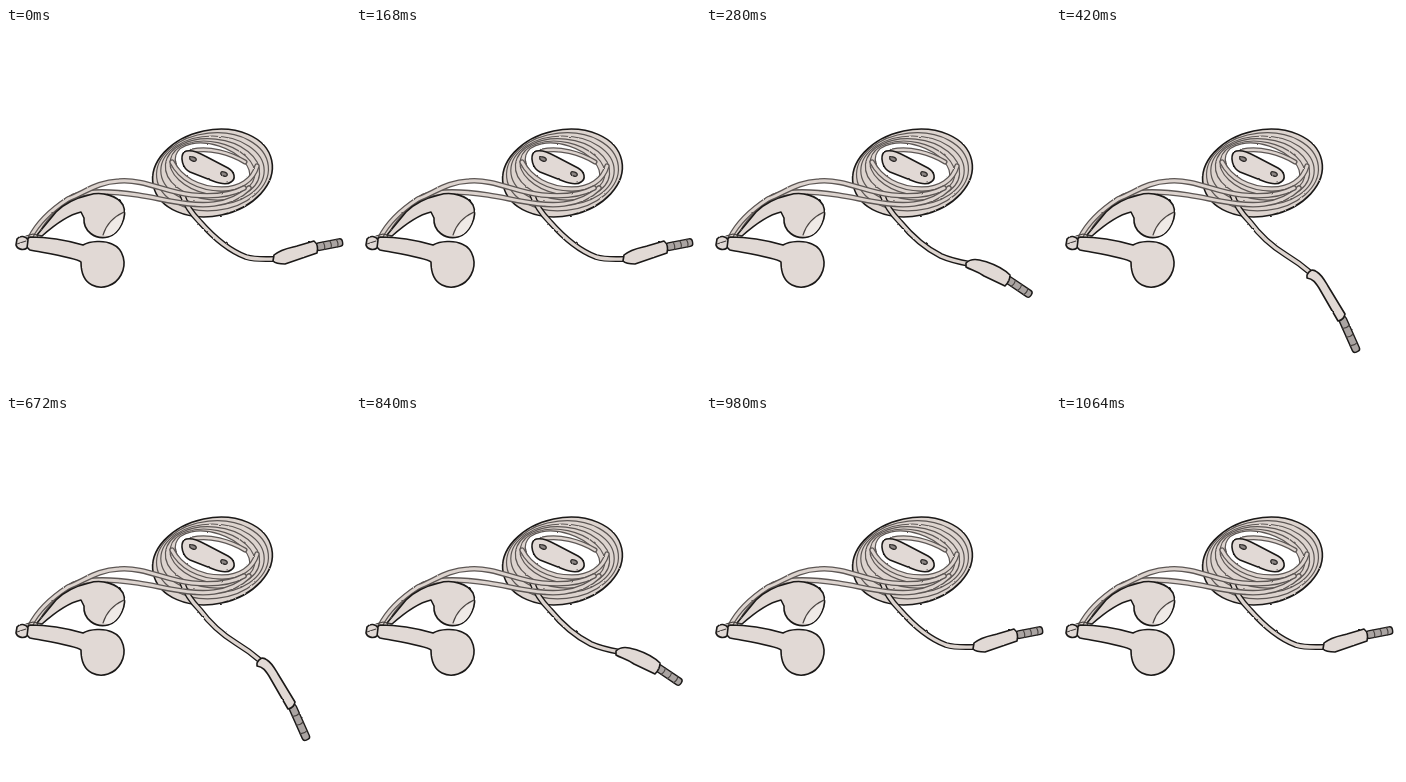
Recreate the animation shown at these times as an HTML page. Size 344 by 360 pixels, loop 1.12 s.

```html
<!DOCTYPE html>
<html lang="en">
<head>
<meta charset="utf-8">
<title>Earphones</title>
<style>
html, body { margin: 0; width: 100%; height: 100%; overflow: hidden; background: #fff; }
svg { display: block; width: 100%; height: 100%; }
path, rect, ellipse { stroke-linecap: round; stroke-linejoin: round; }
.body { fill: #e1d9d5; stroke: #1b1918; stroke-width: 1.6; }
.line { fill: none; stroke: #45403e; stroke-width: 1.1; }
.dot { fill: #8c8583; stroke: #2b2827; stroke-width: 1.2; }
.pose { opacity: 0; }
</style>
</head>
<body>
<svg viewBox="0 0 344 360">
  <defs>
    <filter id="rough" filterUnits="userSpaceOnUse" x="0" y="0" width="344" height="360" color-interpolation-filters="sRGB">
      <feTurbulence type="fractalNoise" baseFrequency=".16" numOctaves="2" seed="4"/>
      <feDisplacementMap in="SourceGraphic" scale="1.7" xChannelSelector="R" yChannelSelector="G"/>
    </filter>
  </defs>
  <g filter="url(#rough)">
    <g id="coil"></g>
    <g id="remote">
      <path class="body" d="M178 124C183 121 190 123 199 128L222 140C229 144 230 151 225 154C221 157 215 156 207 153L184 144C176 140 174 129 178 124Z"/>
      <ellipse class="dot" cx="187" cy="131" rx="3.4" ry="2" transform="rotate(22 187 131)"/>
      <ellipse class="dot" cx="218" cy="146" rx="3.4" ry="2" transform="rotate(22 218 146)"/>
    </g>
    <g id="poses"></g>
    <g id="leads"></g>
    <g id="buds">
      <path class="body" d="M31 207L50 184C59 175 70 170 83 167C96 163 112 168 117 177C122 188 114 206 102 209C89 212 77 203 78 190L75 184C66 186 54 192 36 208Z"/>
      <path d="M98 207C101 198 108 190 117 186C117 196 111 206 102 208Z" fill="#efeae7"/>
      <path class="line" d="M97 207C100 197 107 189 118 184"/>
      <path class="body" d="M24 209C40 209 60 212 77 217C84 213 98 212 106 216C118 221 121 236 115 247C109 258 96 262 86 257C78 253 75 245 75 234C71 230 45 226 24 222C19 219 20 211 24 209Z"/>
      <path class="body" d="M11 211C14 207 20 208 22 212L21 220C17 223 11 221 10 217Z"/>
      <path class="line" d="M11 216L20 213M20 208L27 206L35 208"/>
    </g>
  </g>
</svg>
<script>
const NS = 'http://www.w3.org/2000/svg';
const LOOP = 1120, INK = '#1b1918', SOFT = '#5d5755', SKIN = '#ddd4cf';
const $ = id => document.getElementById(id);

function add(parent, tag, attrs) {
  const el = document.createElementNS(NS, tag);
  for (const k in attrs) el.setAttribute(k, attrs[k]);
  parent.append(el);
  return el;
}

// A cord is a dark stroke with a lighter one on top.
function cord(parent, d, width = 6, ink = INK) {
  add(parent, 'path', { d, fill: 'none', stroke: ink, 'stroke-width': width });
  add(parent, 'path', { d, fill: 'none', stroke: SKIN, 'stroke-width': width - 2.6 });
}

// Loops of the coil shrink and turn from the outer edge to the hole.
const coil = $('coil'), LOOPS = 5;
for (let i = 0; i <= LOOPS; i++) {
  const k = i / LOOPS, cx = 206.5, cy = 145 - 6 * k;
  add(coil, 'ellipse', {
    cx, cy, rx: 60.5 - 22 * k, ry: 43 - 21 * k,
    transform: `rotate(${-12 + 30 * k} ${cx} ${cy})`,
    fill: i < LOOPS ? SKIN : '#fff',
    stroke: i ? SOFT : INK, 'stroke-width': i ? 1.2 : 1.6
  });
}
cord(coil, 'M186 123C203 119 224 125 239 134', 5, SOFT);
cord(coil, 'M166 134C174 150 192 161 216 161C234 161 247 152 251 138', 5.4, SOFT);

const leads = $('leads');
cord(leads, 'M29 209C36 192 51 177 68 168C86 161 112 164 132 167C158 171 184 179 208 176C224 174 235 168 243 160', 5.6, SOFT);
cord(leads, 'M24 210C31 196 45 182 62 171C80 164 91 154 113 153C139 151 158 164 186 167C206 169 225 167 238 160', 5.6, SOFT);

const start = 'M176 166C180 178 186 186 194 194';
const poses = [
  {
    cable: 'C209 211 224 223 240 229C250 232 259 231 270 231',
    plug: 'M268 227C275 221 283 220 291 218L308 213Q313 217 311 225L279 236Q270 236 267 233Z',
    jack: [311, 219, -11, 27], on: [[0, 1], [280, 0], [980, 1], [LOOP, 1]]
  },
  {
    cable: 'C208 211 221 221 235 228C244 232 253 234 264 236',
    plug: 'M260 235C266 229 274 232 281 234C290 237 298 241 304 247Q304 253 299 258L278 248C271 243 265 242 260 239Z',
    jack: [301, 251, 34, 30], on: [[0, 0], [280, 1], [420, 0], [840, 1], [980, 0], [LOOP, 0]]
  },
  {
    cable: 'C205 209 217 219 230 227C240 233 248 239 256 246',
    plug: 'M251 247Q255 239 261 244C266 247 269 253 272 258L289 286Q288 292 282 293L263 260C259 254 257 251 251 250Z',
    jack: [286, 290, 66, 38], on: [[0, 0], [420, 1], [840, 0], [LOOP, 0]]
  }
];

for (const { cable, plug, jack, on } of poses) {
  const g = add($('poses'), 'g', { class: 'pose' });
  cord(g, start + cable);
  const [x, y, a, len] = jack;
  const pin = add(g, 'g', { transform: `translate(${x} ${y}) rotate(${a})` });
  add(pin, 'rect', { x: -1, y: -3.8, width: len, height: 7.6, rx: 3, fill: '#aaa4a2', stroke: INK, 'stroke-width': 1.4 });
  for (let i = 1; i < 4; i++)
    add(pin, 'path', { d: `M${len * i / 4} -3.8q2 4 0 7.6`, class: 'line' });
  add(g, 'path', { d: plug, class: 'body' });
  g.animate(
    on.map(([t, opacity]) => ({ offset: t / LOOP, opacity, easing: 'step-end' })),
    { duration: LOOP, iterations: Infinity }
  );
}
</script>
</body>
</html>
```
